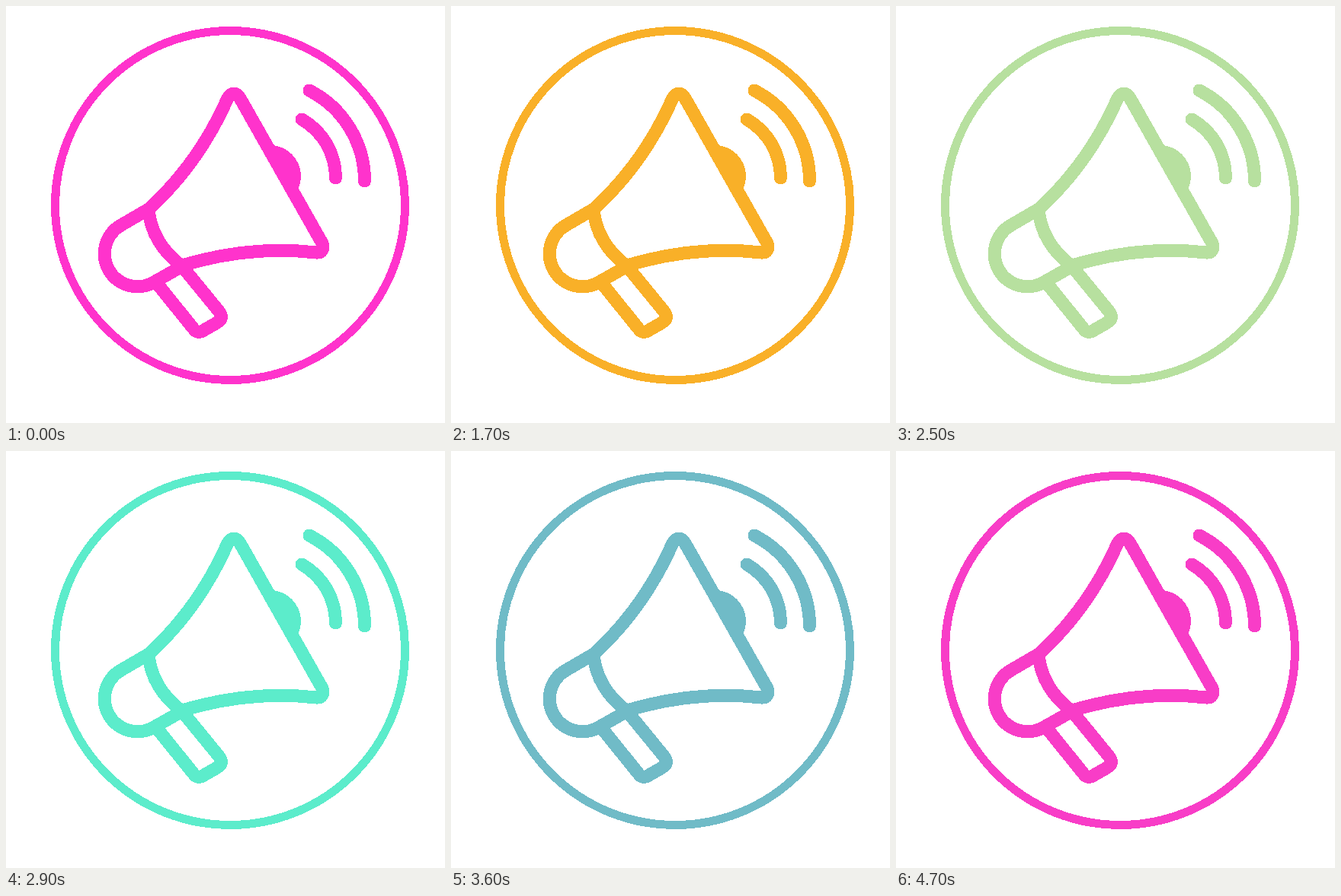
These frames come from a looping animation (576 px wide and 548 px high, 4800 ms). An HTML page:

```html
<!DOCTYPE html>
<html lang="en">
<head>
<meta charset="utf-8">
<title>Megaphone</title>
<style>
  html, body { margin: 0; width: 100%; height: 100%; overflow: hidden; background: #fff; }
  svg { display: block; }
</style>
</head>
<body>
<svg id="icon" width="576" height="548" viewBox="0 0 576 548" fill="none" stroke="currentColor"
     stroke-width="17" stroke-linecap="round" stroke-linejoin="round" shape-rendering="crispEdges">
  <circle cx="294" cy="262" r="229.5" stroke-width="11"/>
  <!-- bell -->
  <path d="M187 267Q253 207 291 121Q299 109 307 121L415 312Q418 325 407 324Q320 314 231 341"/>
  <!-- back and divider -->
  <path d="M231 342L194 363A43 43 0 0 1 151 288L187 267Q191 312 231 342"/>
  <!-- handle -->
  <path d="M200 367L246 424Q251 431 258 427L277 416Q286 411 280 402L231 342"/>
  <path d="M350 183A41 41 0 0 1 384 239L366 228Z" fill="currentColor" stroke="none"/>
  <!-- sound waves -->
  <path d="M388 149A88 88 0 0 1 432.500 226M398 111A133.500 133.500 0 0 1 470.500 230"/>
</svg>
<script>
  const LOOP = 4800, STEP = 100;
  // evenly spaced around the loop
  const colors = ['#ff33cc', '#ff6e79', '#ffaa18', '#ceDD94', '#18f5ec', '#c880a2'];
  const icon = document.getElementById('icon');

  const channels = hex => [1, 3, 5].map(i => parseInt(hex.slice(i, i + 2), 16));

  function colorAt(t) {
    const x = t / LOOP * colors.length, i = Math.floor(x);
    const from = channels(colors[i]), to = channels(colors[(i + 1) % colors.length]);
    return `rgb(${from.map((v, c) => Math.round(v + (to[c] - v) * (x - i)))})`;
  }

  function draw(now) {
    const t = now % LOOP;
    icon.style.color = colorAt(t - t % STEP);
    requestAnimationFrame(draw);
  }
  draw(0);
</script>
</body>
</html>
```
